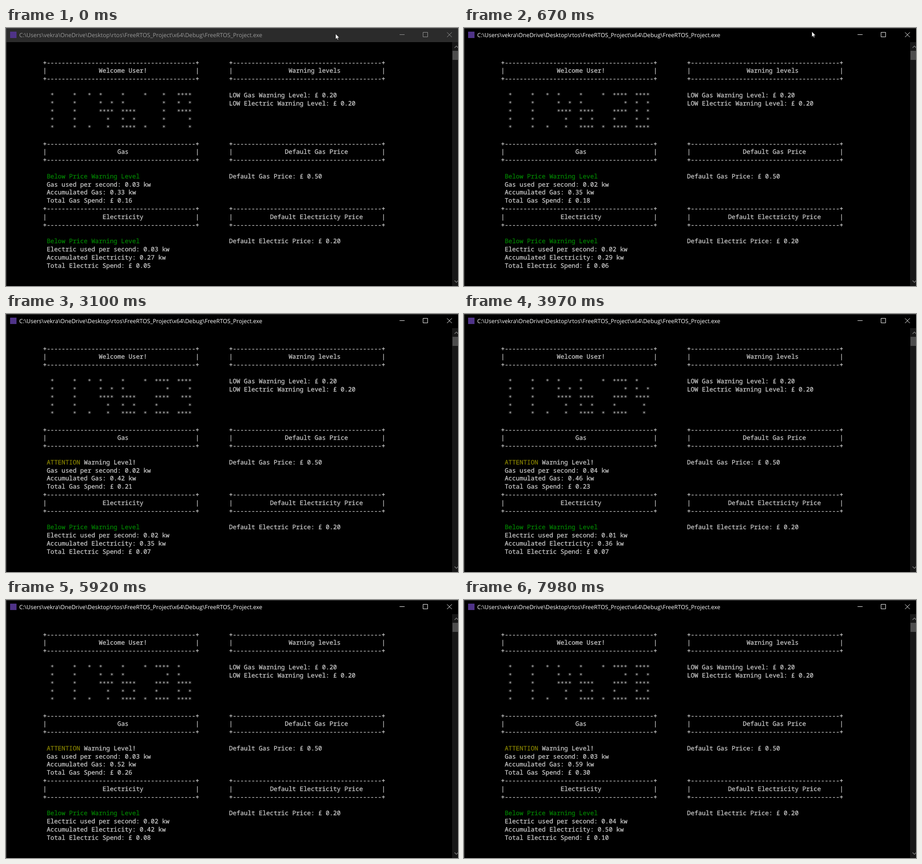
An HTML page that plays this animation: 990x566 px, repeating every 8000 ms.

```html
<!DOCTYPE html>
<html lang="en">
<head>
<meta charset="utf-8">
<title>Energy meter console</title>
<style>
  html, body { margin: 0; width: 100%; height: 100%; overflow: hidden; background: #000; }
  svg { display: block; width: 990px; height: 566px; }
  text { white-space: pre; text-rendering: geometricPrecision; }
  #screen text {
    font: 13.583px "Noto Sans Mono", "DejaVu Sans Mono", monospace;
    color: #ccc; fill: currentColor; stroke: currentColor; stroke-width: .3px;
  }
  #screen .star { font: 13.54px "DejaVu Sans Mono", monospace; color: #c0c0c0; stroke: none; }
  #screen .good { color: #008400; }
  #screen .alert { color: #858000; }
  #bar { fill: #000; }
  #caption { font: 12.54px "Open Sans", "Noto Sans", sans-serif; fill: #fff; }
  #buttons { stroke: #fff; fill: none; }
  .idle #bar { fill: #2b2b2b; }
  .idle #caption { fill: #999; }
  .idle #buttons { stroke: #999; }
</style>
</head>
<body>
<svg id="stage" viewBox="0 0 990 566" class="idle">
  <rect width="990" height="566"/>
  <rect id="bar" width="990" height="31"/>
  <rect x="9" y="8" width="14" height="14" fill="#4f3388"/>
  <text id="caption" x="29" y="20">C:\Users\vekra\OneDrive\Desktop\rtos\FreeRTOS_Project\x64\Debug\FreeRTOS_Project.exe</text>
  <g id="buttons">
    <path d="M862 14.5H873M913.5 9.5H923.5V19.5H913.5Z"/>
    <path d="M966 9.5L976.5 20M976.5 9.5L966 20"/>
  </g>
  <rect x="977" y="31" width="13" height="535" fill="#171717"/>
  <rect x="978" y="50" width="12" height="20" fill="#4d4d4d"/>
  <path d="M982.5 43.5L986.5 39.5L990.5 43.5M982.5 554L986.5 558L990.5 554" fill="none" stroke="#7a7a7a" stroke-width="1.5"/>
  <path d="M0 .5H990M.5 0V566" stroke="#4d4d4d"/>
  <g id="screen"></g>
  <path id="pointer" d="M0 0V11.5L2.6 9.1L4.3 13L6 12.2L4.4 8.5H8Z" fill="#fff" stroke="#000" stroke-width=".5"/>
</svg>
<script>
const LOOP = 8000, COL = 8.15, ROW = 17.8;
const stage = document.getElementById('stage');
const screen = document.getElementById('screen');
const pointer = document.getElementById('pointer');

function put(col, row, str = '', cls = '', dy = 0) {
  const el = document.createElementNS('http://www.w3.org/2000/svg', 'text');
  el.setAttribute('x', col * COL - 0.5);
  el.setAttribute('y', 31 + row * ROW + 14 + dy);
  el.setAttribute('class', cls);
  el.textContent = str;
  screen.append(el);
  return el;
}

function box(col, row, title, indent) {
  const edge = '+' + '-'.repeat(40) + '+';
  put(col, row, edge);
  put(col, row + 1, '|');
  put(col + indent, row + 1, title);
  put(col + 41, row + 1, '|');
  put(col, row + 2, edge);
}

box(10, 2, 'Welcome User!', 15);
box(10, 12, 'Gas', 20);
box(10, 20, 'Electricity', 16);
box(60, 2, 'Warning levels', 16);
box(60, 12, 'Default Gas Price', 15);
box(60, 20, 'Default Electricity Price', 11);
put(60, 6, 'LOW Gas Warning Level: £ 0.20');
put(60, 7, 'LOW Electric Warning Level: £ 0.20');
put(60, 16, 'Default Gas Price: £ 0.50');
put(60, 24, 'Default Electric Price: £ 0.20');
put(11, 24, 'Below Price Warning Level', 'good');

const below = put(11, 16, 'Below Price Warning Level', 'good');
const attention = put(11, 16, 'ATTENTION', 'alert');
const warning = put(21, 16, 'Warning Level!');
const clockRows = [6, 7, 8, 9, 10].map(r => put(10, r, '', 'star', 0.4));

// Five rows of four cells per glyph
const GLYPHS = {
  0: '****|*  *|*  *|*  *|****',
  1: '  * |  * |  * |  * |  * ',
  2: '****|   *|****|*   |****',
  3: '****|   *| ***|   *|****',
  4: '*   |*  *|****|  * |  * ',
  5: '****|*   |****|   *|****',
  6: '*   |*   |****|*  *|****',
  7: '****|*  *|   *|   *|   *',
  8: '****|*  *|****|*  *|****',
  9: '****|*  *|****|   *|   *',
  ':': '*| | | |*'
};

// Usage per reading, in hundredths of a kw; totals add up from `base`
const gas = {
  unit: 'Gas', name: 'Gas', price: 0.5, base: 29.9,
  rates: [3, 2.2, 5, 2, 3.6, 3.6, 3, 3.6, 3.4],
  lines: [17, 18, 19].map(r => put(11, r))
};
const power = {
  unit: 'Electric', name: 'Electricity', price: 0.2, base: 24,
  rates: [3, 2, 4, 2, 1, 4, 2, 4, 4],
  lines: [25, 26, 27].map(r => put(11, r))
};

// Events that have happened by time t, the first at `start`, then one per `period`
const count = (t, start, period) => Math.max(0, Math.floor((t - start) / period) + 1);
const money = n => (Math.round(n) / 100).toFixed(2);
const show = (el, on) => { el.style.display = on ? '' : 'none'; };

function drawClock(sec) {
  const chars = [...`11:46:${sec}`].map(c => GLYPHS[c].split('|'));
  clockRows.forEach((el, r) => { el.textContent = chars.map(g => g[r]).join('  '); });
}

function drawMeter({ unit, name, price, base, rates, lines }, n) {
  const total = rates.slice(0, n + 1).reduce((sum, r) => sum + r, base);
  const spend = total * price;
  lines[0].textContent = `${unit} used per second: ${money(rates[n])} kw`;
  lines[1].textContent = `Accumulated ${name}: ${money(total)} kw`;
  lines[2].textContent = `Total ${unit} Spend: £ ${money(spend)}`;
  return spend;
}

function drawReading(n) {
  const high = Math.round(drawMeter(gas, n)) > 20;
  drawMeter(power, n);
  show(below, !high);
  show(attention, high);
  show(warning, high);
}

function drawPointer(t) {
  const p = Math.min(2, count(t, 150, 120)) / 2;
  pointer.setAttribute('transform', `translate(${722 + 40 * p} ${13 - 5 * p})`);
  show(pointer, t < 2210);
}

let lastTick, lastReading;
function render() {
  const t = performance.now() % LOOP;
  const tick = count(t, 100, 965), reading = count(t, 360, 1080);
  if (tick !== lastTick) drawClock(19 + (lastTick = tick));
  if (reading !== lastReading) drawReading(lastReading = reading);
  drawPointer(t);
  stage.setAttribute('class', t < 670 ? 'idle' : '');
  requestAnimationFrame(render);
}
render();
</script>
</body>
</html>
```
